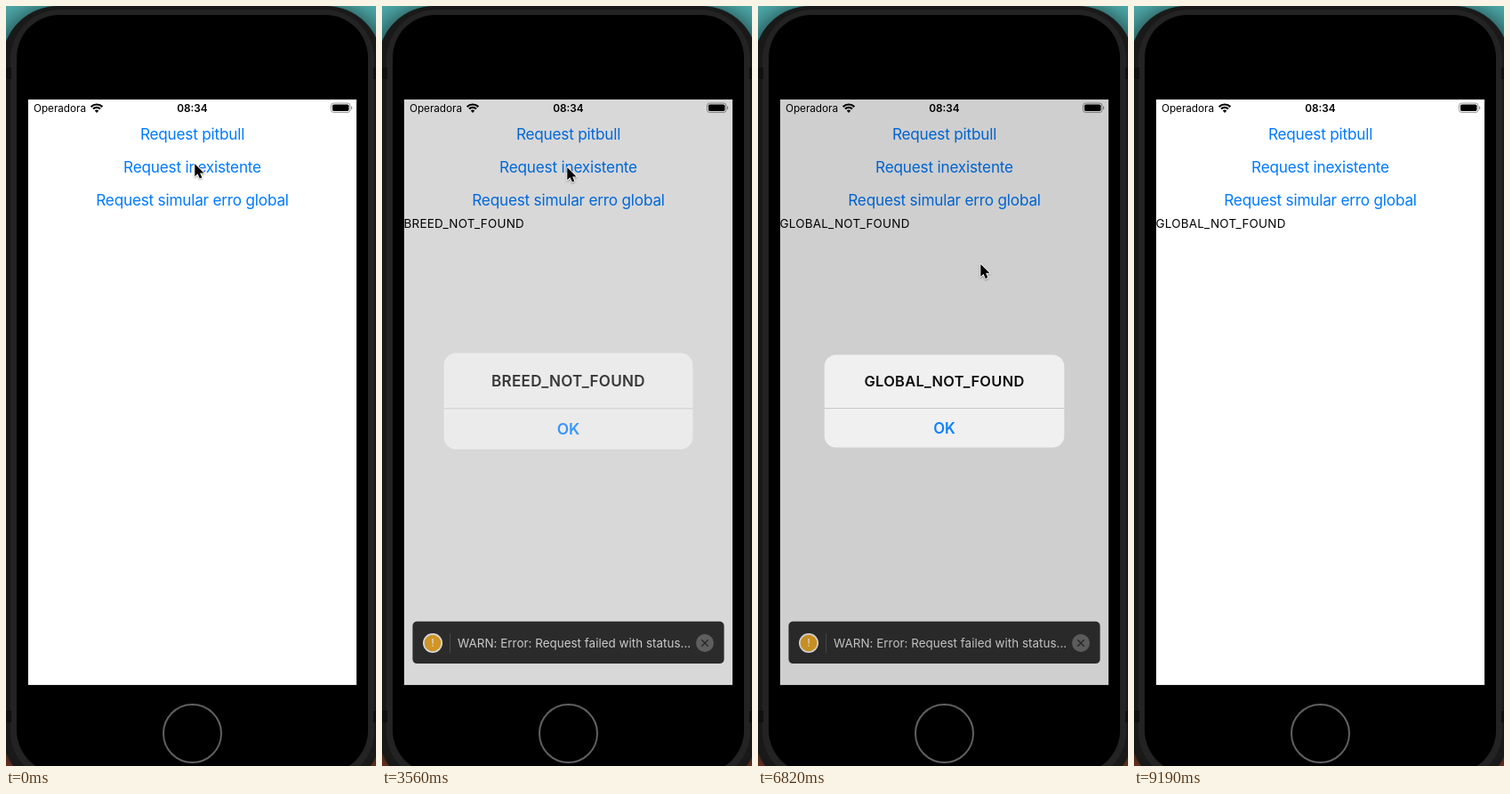
Recreate the animation shown at these times as an HTML page with a canvas. Size 416x853 px, loop 9350 ms.

```html
<!DOCTYPE html>
<html lang="pt">
<head>
<meta charset="utf-8">
<style>
html, body { margin: 0; width: 100%; height: 100%; overflow: hidden; background: #000; }
canvas { display: block; }
</style>
</head>
<body>
<canvas id="stage" width="416" height="853"></canvas>
<script>
const ctx = document.getElementById('stage').getContext('2d');
const LOOP = 9350, STEP = 148.4;
const BLUE = '#007aff';
const SCREEN = [24.7, 104.7, 369.6, 657.6];
const LINKS = ['Request pitbull', 'Request inexistente', 'Request simular erro global'];
const RESPONSE = `{
  "data": {
    "message": "https://images.dog.ceo/breeds/pitbull/
20190801_154956.jpg",
    "status": "success"
  },
  "status": 200,
  "headers": {
    "access-control-allow-origin": "*",
    "age": "0",
    "alt-svc": "h3=\\":443\\"; ma=86400",
    "cache-control": "no-cache, private",
    "cf-cache-status": "DYNAMIC",`.split('\n');

// All times below are counted in steps of STEP ms.
const CURSOR = [
  [0, 212, 177], [3, 220, 145], [13, 220, 145], [18, 208, 181], [26, 208, 181],
  [31, 212, 476], [34, 212, 476], [39, 256, 222], [45, 256, 222], [48, 233, 482],
  [50, 233, 482], [51, 236, 496], [55, 370, 728], [58, 370, 728], [61, 386, 842], [62, 390, 880]
];
const MESSAGES = [
  [0, ''], [6, 'Carregando'], [7, 'json'], [21, 'Carregando'],
  [23, 'BREED_NOT_FOUND'], [40, 'Carregando'], [44, 'GLOBAL_NOT_FOUND']
];
const PRESSES = [4, 20, 39];
const ALERTS = [
  { title: 'BREED_NOT_FOUND', open: 23, press: 32, close: 35 },
  { title: 'GLOBAL_NOT_FOUND', open: 44, press: 49, close: 50 }
];
const FADE_IN = [.35, .76, .95];
const CAPS_SPACING = .27;

function fill(path, color) {
  ctx.fillStyle = color;
  ctx.fill(new Path2D(path));
}

function line(path, color, width) {
  ctx.strokeStyle = color;
  ctx.lineWidth = width;
  ctx.stroke(new Path2D(path));
}

function box(x, y, w, h, radius, color) {
  ctx.fillStyle = color;
  ctx.beginPath();
  ctx.roundRect(x, y, w, h, radius);
  ctx.fill();
}

function disc(x, y, r, color) {
  ctx.fillStyle = color;
  ctx.beginPath();
  ctx.arc(x, y, r, 0, 2 * Math.PI);
  ctx.fill();
}

function text(str, x, y, size, color = '#000', { align = 'left', weight = 400, spacing = 0 } = {}) {
  ctx.font = `${weight} ${size}px Inter, sans-serif`;
  ctx.letterSpacing = spacing + 'px';
  ctx.textAlign = align;
  ctx.fillStyle = color;
  ctx.fillText(str, x, y);
}

function drawPhone() {
  const wall = ctx.createLinearGradient(0, 0, 0, 853);
  wall.addColorStop(0, '#4fa9a9');
  wall.addColorStop(.06, '#3a8a8c');
  wall.addColorStop(.95, '#332626');
  wall.addColorStop(1, '#7a3a24');
  ctx.fillStyle = wall;
  ctx.fillRect(0, 0, 416, 853);
  ctx.save();
  ctx.shadowColor = 'rgba(0,0,0,.6)';
  ctx.shadowBlur = 24;
  box(-4, 0, 426, 878, 62, '#191919');
  ctx.restore();
  box(5, 4, 409, 866, 56, '#232323');
  for (const y of [69, 791]) {
    box(0, y, 6, 13, 0, '#101010');
    box(413, y, 3, 13, 0, '#101010');
  }
  box(12, 10, 395, 851, 48, '#000');
  ctx.strokeStyle = '#606060';
  ctx.lineWidth = 2;
  ctx.beginPath();
  ctx.arc(209.5, 816.5, 32.5, 0, 2 * Math.PI);
  ctx.stroke();
}

function drawStatusBar() {
  text('Operadora', 31, 119, 11.7);
  text('08:34', 209.5, 119, 11.8, '#000', { align: 'center', weight: 600 });
  ctx.strokeStyle = '#000';
  ctx.lineWidth = 2.2;
  for (const r of [5.6, 9]) {
    ctx.beginPath();
    ctx.arc(102, 119.5, r, -Math.PI * .75, -Math.PI * .25);
    ctx.stroke();
  }
  fill('M102 120L99.8 117.6Q102 115.6 104.2 117.6Z', '#000');
  ctx.strokeStyle = '#999';
  ctx.lineWidth = 1;
  ctx.beginPath();
  ctx.roundRect(365.5, 109, 21.5, 10.5, 3);
  ctx.stroke();
  box(367, 110.5, 18.5, 7.5, 1.7, '#000');
  box(388, 112.5, 1.2, 3.5, .6, '#999');
}

function drawLeaves() {
  let seed = 7;
  const random = max => (seed = seed * 16807 % 2147483647) / 2147483647 * max;
  for (let i = 0; i < 380; i++) {
    const y = random(296);
    const tones = y < 110 ? ['#7c9a55', '#34502a', '#a9bd86'] : ['#5d7033', '#25321a', '#3c4a25'];
    disc(random(222), y, 1 + random(4), tones[i % 3]);
  }
}

function drawPhoto() {
  ctx.save();
  ctx.translate(98.5, 263);
  ctx.beginPath();
  ctx.rect(0, 0, 222, 296);
  ctx.clip();
  const back = ctx.createLinearGradient(0, 0, 0, 296);
  back.addColorStop(0, '#57753e');
  back.addColorStop(.5, '#4f6b34');
  back.addColorStop(.65, '#435426');
  back.addColorStop(1, '#2f3b1c');
  ctx.fillStyle = back;
  ctx.fillRect(0, 0, 222, 296);
  // Sky, trees and grass
  fill('M64 44L90 34L137 40V92L112 76L84 88L64 78Z M158 46L222 52V62L186 74L158 84Z M0 36L20 44V58L0 66Z', '#e6edf0');
  fill('M40 0H137V12L100 10L60 6Z M196 0H222V30L190 28Z', '#dfe7e6');
  drawLeaves();
  fill('M160 186H222V212L160 198Z', '#c9cdc6');
  // Rear railings and deck
  fill('M64 84H70V160H64Z M74 98H86V160H74Z M89 38H95V100H89Z M118 100H137V160H118Z', '#543a2b');
  fill('M158 86L222 62V70L158 94Z M158 138L222 142V150L158 146Z', '#62432f');
  line('M164 86V145M174 82V145M184 78V146M194 75V147M204 71V148M214 67V149', '#73503a', 6);
  fill('M64 157H140V174H64Z', '#4c4039');
  line('M64 163H140M64 169H140', '#332b27', 1);
  // Frame
  fill('M22 28H64V182H22Z', '#563b2e');
  fill('M38 42H56V180H38Z', '#432d22');
  fill('M137 0H158V178H137Z', '#51372b');
  fill('M0 12L222 31V54L0 34Z', '#46312a');
  line('M0 13L222 32', '#6a5043', 2);
  for (const [x, y] of [[30, 16], [30, 27], [151, 26], [151, 37]]) disc(x, y, 2.5, '#806253');
  // Dog
  fill('M91 98Q85 115 92 135L97 169H104L107 142L113 142L118 169H124L126 143L132 164H137L138 125Q139 106 120 96Z', '#15171a');
  fill('M88 79Q82 76 85 66Q92 59 105 61Q119 60 121 72Q122 82 116 80Q115 101 104 103Q92 99 93 80Z', '#17191c');
  fill('M103 62L104 79L109 88L105 93H101L98 88L102 79Z', '#b9b7b5');
  fill('M101 90H108L106 102H103Z', '#d87877');
  fill('M96 111L104 107L114 114L107 133L100 127Z', '#e9e7e2');
  line('M90 98Q100 109 119 102', '#2f5c86', 2);
  // Lower frame, slide and ladder
  fill('M0 180L20 178L36 196L10 241L0 236Z', '#2d201c');
  fill('M20 178L164 166V187L20 198Z', '#573c2f');
  line('M20 179L164 167', '#79594a', 2);
  fill('M165 155L181 137Q198 134 206 151Q210 169 222 176V242Q199 226 189 190L166 184Z', '#135448');
  line('M166 157L183 142Q196 139 202 157Q208 176 222 184', '#2b8a73', 5);
  fill('M46 210H150L158 222H46Z', '#30251f');
  fill('M45 240H174L180 266H45Z', '#4b372c');
  fill('M52 222H62L50 296H38Z', '#38291f');
  fill('M62 190H75L79 296H66Z M138 180H150L187 296H172Z', '#573d30');
  fill('M64 196H148L151 207H65Z', '#6b5040');
  fill('M71 224L157 219L162 238L72 244Z M76 286L170 281L174 296H74Z', '#455f61');
  fill('M178 250L222 276V290L172 258Z', '#413027');
  line('M53 74Q59 104 53 138M152 82Q164 108 151 138', '#258570', 5);
  line('M58 188L67 202L71 290M152 205L163 214L184 296', '#23816d', 4);
  ctx.restore();
}

function drawToast() {
  box(34.4, 690.7, 350.2, 47.4, 5, '#333');
  disc(57, 715, 11, '#fff');
  disc(57, 715, 9.3, '#f5b02a');
  text('!', 57, 719.3, 12, '#fff', { align: 'center', weight: 500 });
  box(76, 704, 1, 22, 0, '#555');
  text('WARN: Error: Request failed with status...', 85, 719.5, 13.4, '#eee', { spacing: .03 });
  disc(363, 715, 10, '#707070');
  line('M359.3 711.3L366.7 718.7M366.7 711.3L359.3 718.7', '#333', 1.6);
}

function drawAlert({ title, open, press, close }, step) {
  if (step < open || step > close) return;
  const grow = FADE_IN[step - open] ?? 1;
  const alpha = step === close ? .53 : grow;
  ctx.fillStyle = `rgba(0,0,0,${.2 * alpha})`;
  ctx.fillRect(...SCREEN);
  ctx.save();
  ctx.globalAlpha = alpha;
  ctx.translate(209.5, 443.5);
  ctx.scale(1.2 - .2 * grow, 1.2 - .2 * grow);
  box(-133.5, -51.5, 267, 103, 13, '#f2f2f2');
  if (step === press) box(-133.5, 8, 267, 43.5, [0, 0, 13, 13], '#dcdcda');
  box(-133.5, 7.5, 267, .8, 0, '#c6c6c6');
  text(title, 0, -16, 16.3, '#000', { align: 'center', weight: 600, spacing: CAPS_SPACING });
  text('OK', 0, 36, 16.6, BLUE, { align: 'center', weight: 600 });
  ctx.restore();
}

function drawCursor(step) {
  const next = CURSOR.findIndex(key => key[0] > step);
  if (next < 0) return;
  const [t0, x0, y0] = CURSOR[next - 1], [t1, x1, y1] = CURSOR[next];
  const u = (step - t0) / (t1 - t0), e = u * u * (3 - 2 * u);
  ctx.save();
  ctx.translate(x0 + (x1 - x0) * e, y0 + (y1 - y0) * e);
  const arrow = 'M.3 .3V14.3L3.5 11.3L5.8 16.5L8.3 15.4L6.1 10.4H10.5Z';
  ctx.lineJoin = 'round';
  ctx.shadowColor = 'rgba(0,0,0,.35)';
  ctx.shadowBlur = 2;
  ctx.shadowOffsetY = 1;
  line(arrow, '#fff', 1.8);
  ctx.shadowColor = 'transparent';
  fill(arrow, '#000');
  ctx.restore();
}

function drawScreen(step) {
  ctx.save();
  ctx.beginPath();
  ctx.rect(...SCREEN);
  ctx.clip();
  ctx.fillStyle = '#fff';
  ctx.fillRect(...SCREEN);
  drawStatusBar();
  LINKS.forEach((label, i) => {
    ctx.globalAlpha = [.3, .7][step - PRESSES[i]] ?? 1;
    text(label, 209.5, 149.5 + 37 * i, 17.2, BLUE, { align: 'center', spacing: -.21 });
  });
  ctx.globalAlpha = 1;
  const message = MESSAGES.findLast(([start]) => start <= step)[1];
  if (message === 'json') {
    if (step >= 11) drawPhoto();
    RESPONSE.forEach((row, i) => text(row, 24.5, 572 + 16.5 * i, 13.4));
  } else {
    const spacing = message === 'Carregando' ? 0 : CAPS_SPACING;
    text(message, 24.5, 248.5, 13.4, '#000', { spacing });
  }
  if (step >= 23 && step < 56) drawToast();
  ALERTS.forEach(alert => drawAlert(alert, step));
  ctx.restore();
}

function render() {
  const step = Math.floor((performance.now() % LOOP) / STEP + .1) % 63;
  drawPhone();
  drawScreen(step);
  drawCursor(step);
  requestAnimationFrame(render);
}
render();
</script>
</body>
</html>
```
